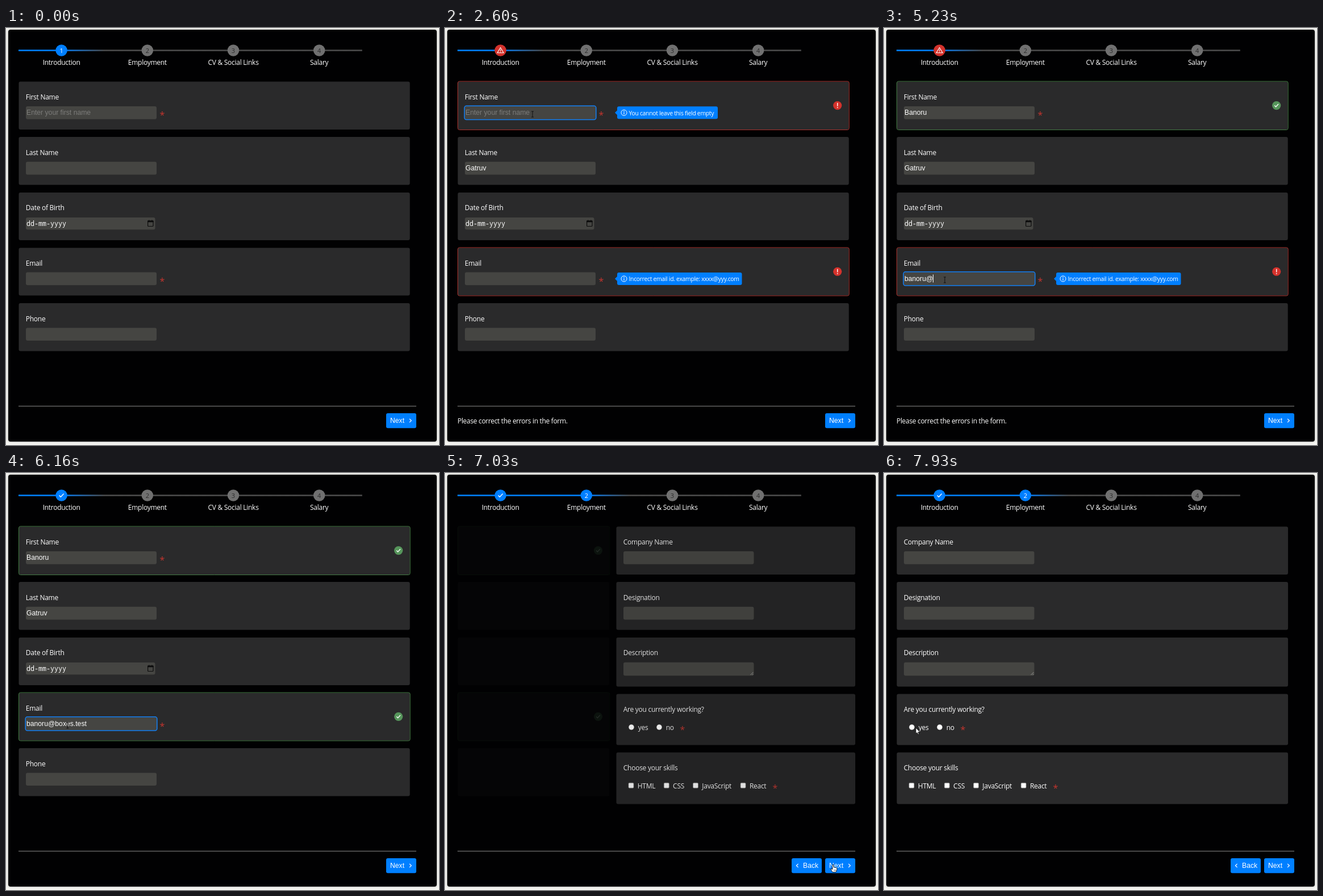
Recreate the animation shown at these times as an HTML page with a canvas. Size 762 px wide and 735 px high, loop 8 s.

```html
<!DOCTYPE html>
<html lang="en">
<head>
<meta charset="utf-8">
<title>Form wizard</title>
<style>
  html, body { margin: 0; width: 100%; height: 100%; overflow: hidden; background: #f8f8f4; }
  canvas { display: block; }
</style>
</head>
<body>
<canvas id="stage" width="762" height="735"></canvas>
<script>
const ctx = document.getElementById('stage').getContext('2d');
const LOOP = 8000;
const BLUE = '#007fff', RED = '#d4322c', CARD = '#2a2a2b', FIELD = '#454542';
const UI = '"Open Sans", "Noto Sans", sans-serif';
const SANS = '"Liberation Sans", Arial, sans-serif';
const MONO = '"Noto Sans Mono", "DejaVu Sans Mono", monospace';

const FIRST = 'Banoru', LAST = 'Gatruv', USER = 'banoru', HOST = 'boxes.test';
const STEPS = ['Introduction', 'Employment', 'CV & Social Links', 'Salary'];
const ROWS = [[94.5, 179], [192, 276.5], [290, 374], [387.5, 471.5], [485, 569.5]];
const JOB_ROWS = [[94.5, 179], [192, 276.5], [290, 376.5], [389.5, 479.5], [492.5, 583.5]];
const CARET_ON = [[600, 900], [1100, 1730], [2360, 2600], [2760, 3400], [4100, 4360],
  [4560, 5130], [5230, 6160]];
// time, x, y of the pointer's hot spot
const POINTER = [
  [430, 8, 250], [600, 67, 257], [1730, 67, 257], [1930, 330, 165], [2060, 470, 146],
  [2200, 300, 128], [2360, 154, 152], [3660, 154, 152], [3780, 291, 245], [3960, 100, 460],
  [4100, 107, 444], [6160, 107, 444], [6500, 560, 722], [6760, 683, 690], [7330, 683, 690],
  [7700, 200, 402], [7830, 45, 430], [7930, 56, 449]
];

const clamp = v => Math.max(0, Math.min(1, v));
const between = (t, a, b) => t >= a && t < b;

function text(str, x, y, color = '#fff', font = '12px ' + UI, spacing = -0.27, align = 'left') {
  ctx.font = font;
  ctx.letterSpacing = spacing + 'px';
  ctx.textAlign = align;
  ctx.fillStyle = color;
  ctx.fillText(str, x, y);
}
const plain = (str, x, y, color) => text(str, x, y, color, '12.2px ' + SANS, 0);
const star = (x, y) => text('*', x, y + 9, '#c5352e', '16px ' + UI, 0, 'center');

function box(x0, y0, x1, y1, r, fill, stroke, width = 1) {
  ctx.beginPath();
  ctx.roundRect(x0, y0, x1 - x0, y1 - y0, r);
  if (fill) { ctx.fillStyle = fill; ctx.fill(); }
  if (stroke) { ctx.strokeStyle = stroke; ctx.lineWidth = width; ctx.stroke(); }
}

function disc(x, y, r, fill) {
  ctx.beginPath();
  ctx.arc(x, y, r, 0, 7);
  ctx.fillStyle = fill;
  ctx.fill();
}

function line(points, color = '#fff', width = 1.2, close = false) {
  ctx.beginPath();
  points.forEach(([x, y]) => ctx.lineTo(x, y));
  if (close) ctx.closePath();
  ctx.strokeStyle = color;
  ctx.lineWidth = width;
  ctx.stroke();
}

const tick = (x, y, s) => line([[x - 4 * s, y], [x - 1.3 * s, y + 2.8 * s], [x + 4 * s, y - 3 * s]], '#fff', 1.3);

function typed(str, t, t0, t1) {
  if (t < t0) return '';
  return str.slice(0, 1 + Math.floor((t - t0) / (t1 - t0) * (str.length - 1) + 1e-6));
}

function stateAt(t) {
  const invalid = t >= 1100;
  const firstOk = t >= 2760, emailOk = t >= 5860;
  return {
    first: typed(FIRST, t, 2760, 3130),
    last: typed(LAST, t, 1100, 1430),
    email: typed(USER, t, 4560, 4860) + (t >= 5230 ? '@' : '') + typed(HOST, t, 5430, 5930),
    firstStatus: firstOk ? 'ok' : invalid ? 'bad' : '',
    emailStatus: emailOk ? 'ok' : invalid ? 'bad' : '',
    focus: between(t, 600, 2360) ? 'last' : between(t, 2360, 4100) ? 'first'
      : between(t, 4100, 6930) ? 'email' : '',
    caret: CARET_ON.some(([a, b]) => between(t, a, b)),
    tip: clamp((t - 1070) / 130),
    stepOne: emailOk ? 'ok' : invalid ? 'bad' : '',
    jobs: t >= 6930
  };
}

function card(x0, x1, [y0, y1], status) {
  box(x0, y0, x1, y1, 3, CARD);
  if (!status) return;
  const bad = status === 'bad', x = x1 - 20, y = (y0 + y1) / 2 - 0.2;
  box(x0, y0 - 0.5, x1 + 0.5, y1 + 0.5, 3, null, bad ? '#a8312d' : '#427a43');
  disc(x, y, 7.6, bad ? RED : '#56955b');
  if (bad) {
    line([[x, y - 4.5], [x, y + 1.2]], '#fff', 1.5);
    disc(x, y + 3.6, 0.9, '#fff');
  } else tick(x, y, 0.85);
}

function field(y, value, focused, caret) {
  box(35, y, 265, y + 22.7, 3, FIELD);
  if (focused) box(34.2, y - 0.8, 265.8, y + 23.5, 3.5, null, '#1481f5', 1.5);
  plain(value, 36, y + 15.4);
  if (focused && caret) {
    const x = 36 + ctx.measureText(value).width;
    ctx.fillRect(Math.round(x), y + 4, 1, 14);
  }
}

function tip(str, y, right, alpha) {
  ctx.save();
  ctx.globalAlpha *= alpha;
  box(303, y, right, y + 22, 3, BLUE);
  ctx.beginPath();
  ctx.moveTo(299, y + 11);
  ctx.lineTo(304, y + 6);
  ctx.lineTo(304, y + 16);
  ctx.fill();
  box(310, y + 6, 320, y + 16, 5, null, '#fff');
  line([[315, y + 10.3], [315, y + 14]], '#fff', 1.1);
  disc(315, y + 8.6, 0.8, '#fff');
  text(str, 323.5, y + 15.2, '#fff', '10.4px ' + UI, -0.3);
  ctx.restore();
}

function calendar(x, y) {
  box(x + 0.6, y + 1.6, x + 10, y + 11, 1, null, '#0c0c0c', 1.2);
  ctx.fillStyle = '#0c0c0c';
  ctx.fillRect(x, y + 1, 10.6, 2.8);
  ctx.fillRect(x + 2, y, 1.3, 2);
  ctx.fillRect(x + 7.2, y, 1.3, 2);
}

function introForm(s, x1, alpha) {
  ctx.save();
  ctx.globalAlpha = alpha;
  const status = [s.firstStatus, '', '', s.emailStatus, ''];
  ROWS.forEach((row, i) => card(22.5, x1, row, status[i]));
  if (alpha > 0.2) {
    ['First Name', 'Last Name', 'Date of Birth', 'Email', 'Phone']
      .forEach((label, i) => text(label, 34.8, 125.8 + 97.7 * i));
    field(138, s.first, s.focus === 'first', s.caret);
    if (!s.first) plain('Enter your first name', 36, 153.4, '#7d7d7b');
    field(235.8, s.last, s.focus === 'last', s.caret);
    box(35, 334, 262.5, 355.3, 3, FIELD);
    text('dd-mm-yyyy', 36, 348.8, '#fff', '500 11.7px ' + MONO, 0);
    calendar(249, 338.5);
    field(430.5, s.email, s.focus === 'email', s.caret);
    field(528.4, '');
    star(275, 150);
    star(275, 442.5);
    if (s.firstStatus === 'bad') tip('You cannot leave this field empty', 138.3, 480, s.tip);
    if (s.emailStatus === 'bad') tip('Incorrect email id. example: xxxx@yyy.com', 431, 522.5, s.tip);
  }
  ctx.restore();
}

function jobForm(x0, x1, alpha) {
  ctx.save();
  ctx.globalAlpha = alpha;
  JOB_ROWS.forEach(row => card(x0, x1, row));
  ctx.translate(x0 - 22.5, 0);
  const labelY = [125.8, 223.5, 321.3, 421, 524];
  ['Company Name', 'Designation', 'Description', 'Are you currently working?', 'Choose your skills']
    .forEach((label, i) => text(label, 34.8, labelY[i]));
  [[138, 160.7], [235.8, 258.5], [333.7, 357.3]].forEach(([a, b]) => box(35, a, 264.5, b, 3, FIELD));
  line([[258.5, 356], [263.5, 351]], '#aaa', 0.8);
  line([[261.5, 356], [263.5, 354]], '#aaa', 0.8);
  [[49, 'yes'], [98, 'no']].forEach(([x, label]) => {
    disc(x, 448, 5, '#777');
    disc(x, 448, 4.5, '#fff');
    text(label, x + 11.7, 452.5);
  });
  star(139, 448.5);
  [[48.5, 'HTML'], [110.8, 'CSS'], [162, 'JavaScript'], [245.6, 'React']].forEach(([x, label]) => {
    box(x - 4.5, 546.2, x + 4.5, 555.2, 1.5, '#fff', '#777', 0.8);
    text(label, x + 11.3, 555.8);
  });
  star(302, 551.5);
  ctx.restore();
}

function stepper(s) {
  const width = 151.2, active = s.jobs ? 1 : 0, mid = 22 + width * (active + 0.5);
  const fade = ctx.createLinearGradient(mid, 0, mid + width / 2, 0);
  fade.addColorStop(0, BLUE);
  fade.addColorStop(1, '#4b4b4b');
  ctx.fillStyle = fade;
  ctx.fillRect(22, 38.2, width * 4, 2.6);
  STEPS.forEach((label, i) => {
    const x = 22 + width * (i + 0.5), y = 39.5, mark = i ? '' : s.stepOne;
    disc(x, y, 10.3, mark === 'bad' ? RED : i <= active ? BLUE : '#707070');
    if (mark === 'ok') tick(x, y, 1);
    else if (mark === 'bad') {
      line([[x, y - 5], [x + 5.5, y + 4.2], [x - 5.5, y + 4.2]], '#fff', 1.1, true);
      line([[x, y - 1.8], [x, y + 1.2]], '#fff', 1.1);
      disc(x, y + 2.7, 0.6, '#fff');
    } else text(i + 1, x, 43.7, i <= active ? '#fff' : '#2c2c2c', '11px ' + UI, 0, 'center');
    text(label, x, 65, '#fff', undefined, undefined, 'center');
  });
}

function button(x, label, labelX, chevronX, dir) {
  box(x, 679, x + 53, 705.3, 3, BLUE);
  plain(label, labelX, 696);
  line([[chevronX - dir * 1.6, 688.8], [chevronX + dir * 1.6, 692], [chevronX - dir * 1.6, 695.2]], '#fff', 1.2);
}

function footer(s) {
  ctx.fillStyle = '#626262';
  ctx.fillRect(22, 665.8, 700, 1.5);
  if (s.stepOne === 'bad') text('Please correct the errors in the form.', 22, 697, '#fff', undefined, -0.32);
  if (s.jobs) button(610, 'Back', 630, 620, -1);
  button(669, 'Next', 676, 711.7, 1);
}

function shape(x, y, points) {
  ctx.beginPath();
  points.forEach(([px, py]) => ctx.lineTo(x + px, y + py));
  ctx.closePath();
  ctx.fillStyle = '#fff';
  ctx.fill();
  ctx.strokeStyle = '#000';
  ctx.lineWidth = 0.8;
  ctx.stroke();
}

function pointer(t, s) {
  if (t < POINTER[0][0]) return;
  let i = 0;
  while (i < POINTER.length - 2 && t >= POINTER[i + 1][0]) i++;
  const [t0, ax, ay] = POINTER[i], [t1, bx, by] = POINTER[i + 1];
  const k = clamp((t - t0) / (t1 - t0)), x = ax + (bx - ax) * k, y = ay + (by - ay) * k;
  const inField = !s.jobs && x > 35 && x < 265 &&
    [138, 235.8, 430.5, 528.4].some(top => between(y, top, top + 22.7));
  if (inField) {
    line([[x, y - 5], [x, y + 5]], '#111', 1);
    [-5, 5].forEach(d => line([[x - 2, y + d], [x + 2, y + d]], '#111', 1));
  } else if (x > 669 && between(y, 679, 705)) {
    shape(x, y, [[-1, 0.5], [0, 0], [1, 0.5], [1.2, 5], [4, 5.4], [6.5, 6.2], [7, 8], [6, 11],
      [5, 13.5], [-1, 13.5], [-3.8, 9], [-3.6, 7.3], [-1, 8.6]]);
    [2, 4.2].forEach(d => line([[x + d, y + 9], [x + d, y + 11.5]], '#000', 0.7));
  } else {
    shape(x, y, [[0, 0], [0, 10.5], [2.3, 8.4], [4, 12], [5.6, 11.2], [4.1, 7.8], [7.2, 7.6]]);
  }
}

function draw(t) {
  const s = stateAt(t);
  ctx.fillStyle = '#f8f8f4';
  ctx.fillRect(0, 0, 762, 735);
  ctx.save();
  ctx.shadowColor = 'rgba(0,0,0,.35)';
  ctx.shadowBlur = 4;
  box(4, 3, 758, 729, 4, '#010102');
  ctx.restore();

  stepper(s);
  if (!s.jobs) introForm(s, 710.7, 1);
  else if (t < 7100) {
    const age = t - 6900, split = 722 - 3.21 * age;
    const out = clamp(1 - age / 145);
    if (out > 0) introForm(s, split - 12, out);
    jobForm(split, 722, clamp(age / 153));
  } else jobForm(22.5, 711, 1);
  footer(s);
  pointer(t, s);
}

const start = performance.now();
function frame(now) {
  draw(Math.max(0, now - start) % LOOP);
  requestAnimationFrame(frame);
}
draw(0);
requestAnimationFrame(frame);
</script>
</body>
</html>
```
